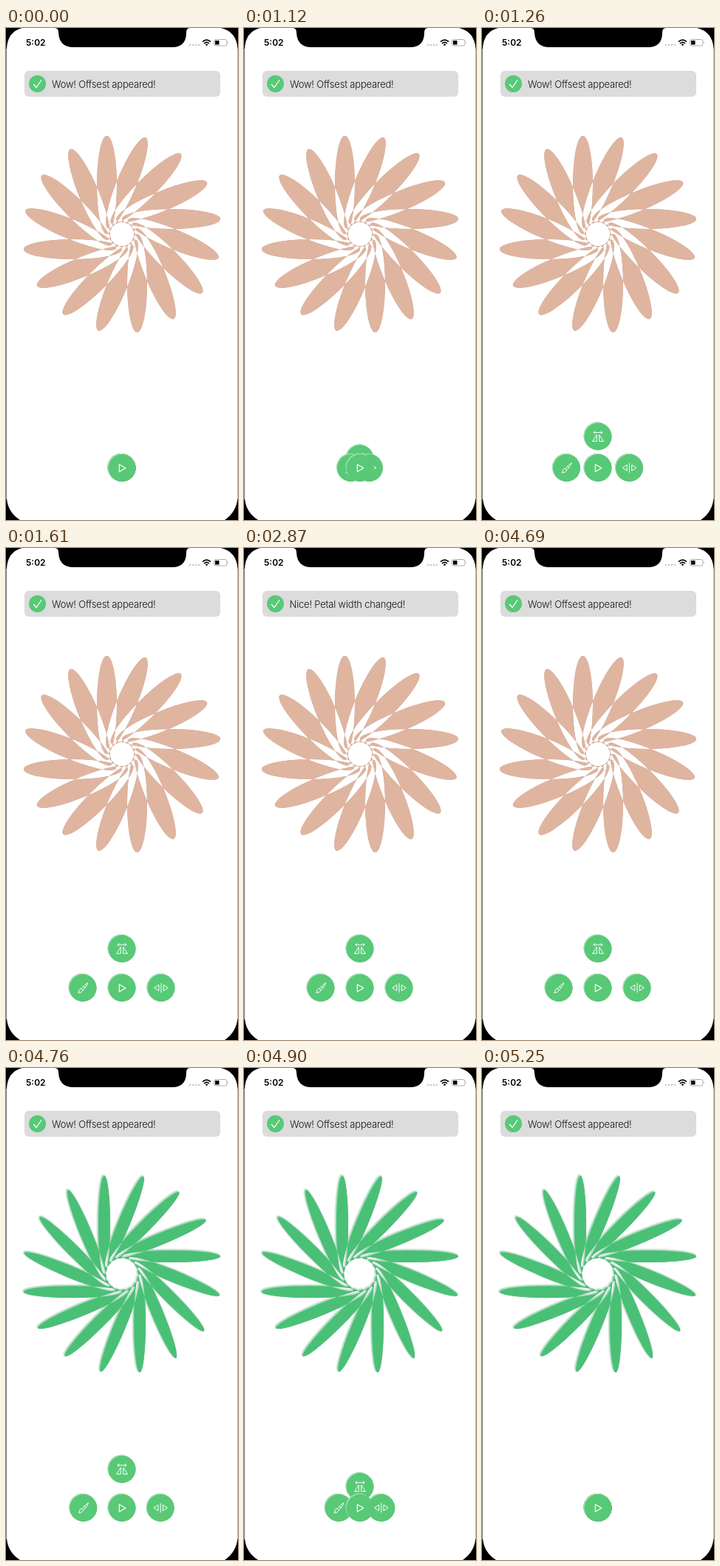
An HTML page for the animation above (6.02 s loop, 314 by 666 pixels).

```html
<!DOCTYPE html>
<html lang="en">
<head>
<meta charset="utf-8">
<title>Flower editor</title>
<style>
  html, body { margin: 0; width: 100%; height: 100%; overflow: hidden; background: #000; }
  svg { display: block; width: 314px; height: 666px; }
  text { font-family: Inter, "Open Sans", sans-serif; fill: #151515; }
  .message { font-size: 13px; font-weight: 300; letter-spacing: -.2px; }
  .clock { font-size: 12px; font-weight: 600; fill: #000; }
  .line { fill: none; stroke: #fff; stroke-linecap: round; stroke-linejoin: round; }
  .disc { fill: #58c976; filter: drop-shadow(-.7px -.7px .7px #a9e9bb) drop-shadow(.6px .6px .6px #8a9a8e); }
  #tan { fill: #dfb5a0; filter: drop-shadow(.5px .6px .6px #b9a39a); }
  #green { fill: #4ac077; filter: drop-shadow(-1px -.4px 1px #a8ecc0) drop-shadow(.6px .6px .6px #8b978e); }
</style>
</head>
<body>
<svg viewBox="0 0 314 666">
  <!-- phone frame -->
  <rect width="314" height="666"/>
  <path fill="#777" d="M0 28H314V638H0Z"/>
  <path fill="#fff" d="M1 28Q2 5 22 0H66Q71 0 71 6Q72 26 91 26H225Q244 26 244 6Q244 0 249 0H291Q312 5 313.5 28V636Q312 655 296 666H19Q2 655 1 636Z"/>

  <!-- status bar -->
  <text class="clock" x="27" y="24">5:02</text>
  <g fill="#c4c4c4">
    <circle cx="249" cy="23" r="1.2"/><circle cx="253" cy="23" r="1.2"/>
    <circle cx="257" cy="23" r="1.2"/><circle cx="261" cy="23" r="1.2"/>
  </g>
  <g fill="none" stroke="#000" stroke-width="1.7">
    <path d="M266 18.7Q271.500 13.600 277 18.700M268 21Q271.500 17.700 275 21"/>
    <path fill="#000" stroke="none" d="M269.600 22.200Q271.500 20.700 273.400 22.200L271.500 24.300Z"/>
  </g>
  <rect x="281.5" y="15.500" width="17.500" height="8.500" rx="2.500" fill="none" stroke="#aaa"/>
  <path d="M283 17h5.500v5.500h-5.500z"/>
  <path d="M300.300 18.300q1.400 1.500 0 3z" fill="#aaa"/>

  <!-- banner -->
  <rect x="25" y="58" width="265" height="35" rx="6" fill="#dcdcdc"/>
  <circle cx="42.500" cy="75.500" r="11.500" fill="#58c976"/>
  <path class="line" stroke-width="1.300" d="M37.500 76.500L41 80.500L48 70.500"/>
  <text class="message" id="wow" x="62" y="81">Wow! Offsest appeared!</text>
  <text class="message" id="nice" x="61.500" y="81">Nice! Petal width changed!</text>

  <path id="tan" fill-rule="evenodd"/>
  <path id="green" fill-rule="evenodd"/>

  <!-- menu -->
  <g id="flip">
    <circle class="disc" r="18.500"/>
    <path class="line" d="M-6 -5.500H6M-4 -7.300L-6 -5.500L-4 -3.700M4 -7.300L6 -5.500L4 -3.700M-1.700 -2V6.500H-7ZM1.700 -2V6.500H7Z"/>
  </g>
  <g id="brush">
    <circle class="disc" r="18.500"/>
    <path class="line" d="M6.500 -6.500Q4 -5.500 -2 1L0 3Q6 -3 6.500 -6.500ZM-2 1Q-5.500 1 -5 4.500L-6.500 6.500Q-1 7 0 3M1 -2L3 0"/>
  </g>
  <g id="spread">
    <circle class="disc" r="18.500"/>
    <path class="line" d="M0 -6V6M-3.200 -3.800V3.800L-9 0ZM3.200 -3.800V3.800L9 0Z"/>
  </g>
  <g transform="translate(157 595.500)">
    <circle class="disc" r="18.500"/>
    <path class="line" stroke-width="1.200" d="M-3.700 -4.700V5.300L4.800 .3Z"/>
  </g>
</svg>
<script>
  const LOOP = 6020, STEP = 70, REACH = 53;
  const CENTER = { x: 157, y: 279 }, PETAL_LENGTH = 133;
  const el = id => document.getElementById(id);

  // Overlapping ellipses set off from the centre; even-odd filling cuts the pattern.
  function flower(offset, width) {
    let path = "";
    for (let k = 0; k < 16; k++) {
      const a = k * Math.PI / 8, x = offset + width / 2;
      const point = y => {
        const px = CENTER.x + x * Math.cos(a) - y * Math.sin(a);
        const py = CENTER.y + x * Math.sin(a) + y * Math.cos(a);
        return px.toFixed(2) + " " + py.toFixed(2);
      };
      const arc = `A${width / 2} ${PETAL_LENGTH / 2} ${k * 22.5} 0 1 `;
      path += `M${point(0)}${arc}${point(PETAL_LENGTH)}${arc}${point(0)}Z`;
    }
    return path;
  }

  function ease(t, start, duration) {
    const u = Math.min(1, Math.max(0, (t - start) / duration));
    return u * u * (3 - 2 * u);
  }

  function place(id, dx, dy) {
    el(id).setAttribute("transform", `translate(${157 + dx} ${595.5 + dy})`);
  }

  function draw(t) {
    const open = REACH * (ease(t, 1010, 350) - ease(t, 4735, 350));
    place("flip", 0, -open);
    place("brush", -open, 0);
    place("spread", open, 0);

    const swap = ease(t, 1930, 350), cleared = t >= 2940;
    el("wow").style.opacity = cleared ? ease(t, 3690, 370) : 1 - swap;
    el("nice").style.opacity = cleared ? 0 : swap;

    const applied = t >= 4760;
    el("tan").style.display = applied ? "none" : "";
    el("green").style.display = applied ? "" : "none";
  }

  el("tan").setAttribute("d", flower(7, 27));
  el("green").setAttribute("d", flower(16, 16));

  const begin = performance.now();
  function tick() {
    const t = (performance.now() - begin) % LOOP;
    draw(Math.floor(t / STEP) * STEP);
    requestAnimationFrame(tick);
  }
  tick();
</script>
</body>
</html>
```
